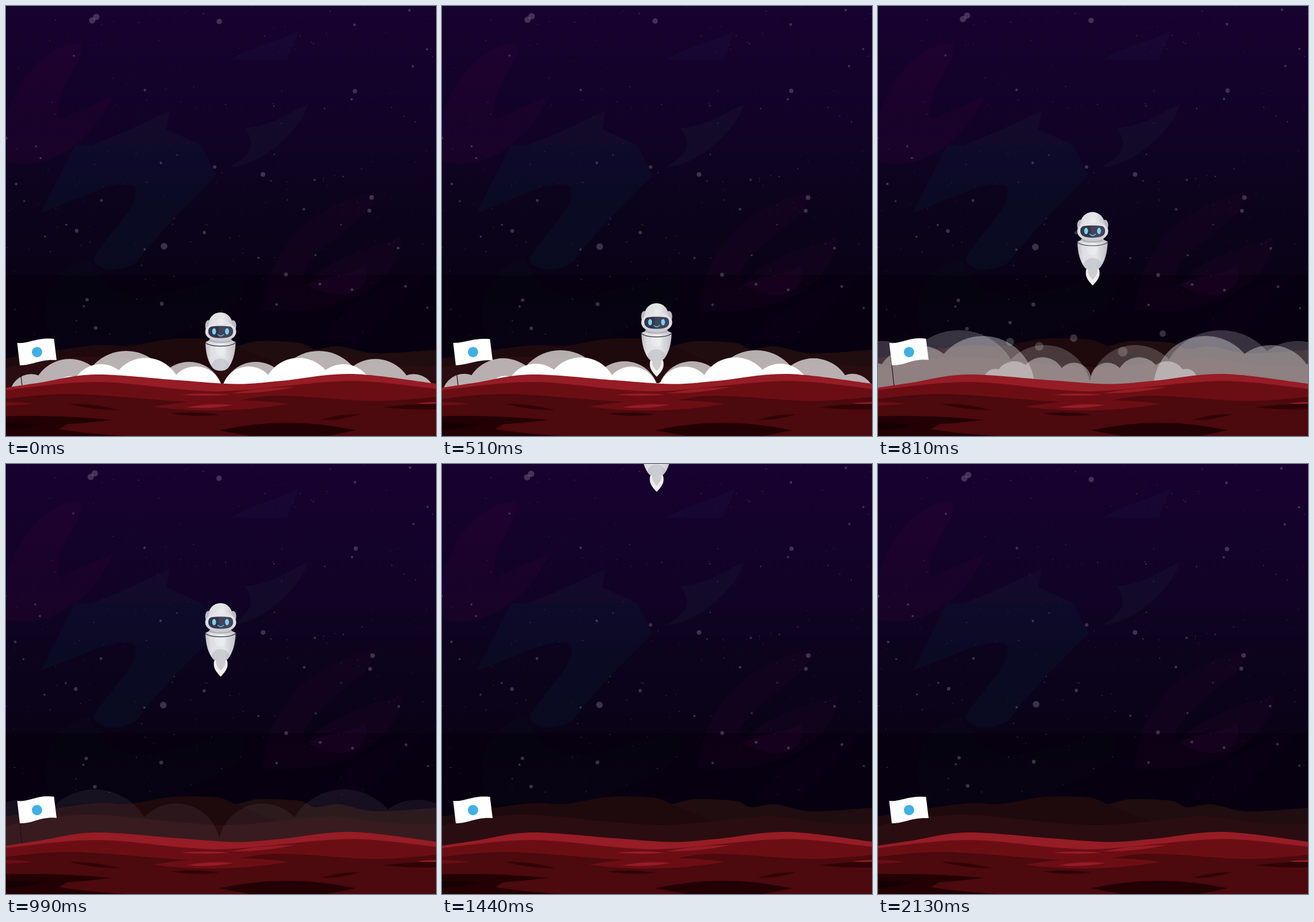
These frames come from a looping animation (748x748 px, 2.16 s). An HTML page with a canvas:

```html
<!DOCTYPE html>
<html lang="en">
<head>
<meta charset="utf-8">
<title>Lift-off</title>
<style>
html, body { margin: 0; width: 100%; height: 100%; overflow: hidden; background: #080113; }
canvas { display: block; width: 748px; height: 748px; }
</style>
</head>
<body>
<canvas id="stage" width="748" height="748"></canvas>
<script>
const SIZE = 748, LOOP = 2160, STEP = 30, TAU = 2 * Math.PI;
const ctx = document.getElementById('stage').getContext('2d');

const lerp = (a, b, k) => a + (b - a) * k;
const clamp = v => Math.max(0, Math.min(1, v));

function fill(shape, color) {
  ctx.fillStyle = color;
  ctx.fill(typeof shape === 'string' ? new Path2D(shape) : shape);
}

function stroke(d, color, width) {
  ctx.strokeStyle = color;
  ctx.lineWidth = width;
  ctx.stroke(new Path2D(d));
}

function oval(x, y, rx, ry, color) {
  ctx.beginPath();
  ctx.ellipse(x, y, rx, ry, 0, 0, TAU);
  ctx.fillStyle = color;
  ctx.fill();
}

function gradient(x0, y0, x1, y1, stops) {
  const g = ctx.createLinearGradient(x0, y0, x1, y1);
  stops.forEach(([at, color]) => g.addColorStop(at, color));
  return g;
}

// Smooth line through points, closed along the bottom of the stage
function ridge(points) {
  const p = new Path2D();
  const at = i => points[Math.max(0, Math.min(points.length - 1, i))];
  p.moveTo(...at(0));
  for (let i = 0; i < points.length - 1; i++) {
    const [a, b, c, d] = [at(i - 1), at(i), at(i + 1), at(i + 2)];
    p.bezierCurveTo(b[0] + (c[0] - a[0]) / 6, b[1] + (c[1] - a[1]) / 6,
      c[0] - (d[0] - b[0]) / 6, c[1] - (d[1] - b[1]) / 6, ...c);
  }
  p.lineTo(at(Infinity)[0], SIZE);
  p.lineTo(at(0)[0], SIZE);
  return p;
}

// ---- Sky ----
let seed = 41;
const rand = () => (seed = (seed * 16807) % 2147483647) / 2147483647;
const scatter = (n, size) => Array.from({ length: n }, () => [rand() * SIZE, rand() * 585, size()]);

const stars = [
  [150, 25, 5.5], [157, 19, 5.5], [371, 27, 4.7], [607, 148, 3.8], [447, 293, 4],
  [636, 333, 4], [632, 356, 3.4], [275, 418, 5.8], [123, 391, 3.2], [487, 467, 3.4],
  [271, 518, 3.4], [141, 511, 3], [156, 560, 3.2], [363, 280, 3], [345, 394, 2.9],
  ...scatter(28, () => 1.7 + rand() * .8),
  ...scatter(290, () => .4 + rand() * rand())
];

const nebulae = [
  ['M0 200C20 110 90 60 130 66C140 95 80 150 92 198L186 156C150 240 70 290 0 270Z', 'rgba(110,0,80,.09)'],
  ['M150 242L200 222L285 182L279 215L340 242Z', 'rgba(40,60,75,.13)'],
  ['M120 242H340L366 295C320 340 270 390 228 445C200 465 160 462 152 440C180 390 235 350 224 314C190 300 140 330 60 360Z', 'rgba(0,55,85,.13)'],
  ['M414 212C460 212 500 180 526 171C510 220 440 280 390 280C430 255 435 240 414 212Z', 'rgba(40,60,75,.12)'],
  ['M392 93C430 68 475 62 510 42L488 94Z', 'rgba(30,55,100,.1)'],
  ['M72 560C55 510 90 450 145 440C200 560 300 480 410 468C440 540 310 555 265 590H90Z', 'rgba(0,50,40,.06)'],
  ['M645 322C640 380 500 430 520 485C560 440 640 415 690 402C680 480 600 540 445 530C460 420 520 350 645 322Z', 'rgba(105,0,75,.07)'],
  ['M525 485C560 465 600 470 625 450C640 500 580 520 525 485Z', 'rgba(90,0,110,.1)'],
  ['M540 582C590 540 600 500 735 462C700 500 655 545 610 586Z', 'rgba(60,5,50,.08)']
];

function sky(t) {
  ctx.fillStyle = gradient(0, 0, 0, SIZE, [
    [0, '#180230'], [.2, '#130229'], [.325, '#100324'], [.46, '#0c031c'],
    [.6256, '#0a0317'], [.6257, '#060010'], [1, '#080012']
  ]);
  ctx.fillRect(0, 0, SIZE, SIZE);
  nebulae.forEach(([d, color]) => fill(d, color));
  // larger, nearer stars drift further from the centre
  const drift = (1 - Math.cos(t / LOOP * TAU)) / 2;
  stars.forEach(([x, y, r]) => {
    const k = drift * r * .0018;
    oval(x + (x - 415) * k, y + (y - 290) * k, r, r, 'rgba(205,190,220,.25)');
  });
}

// ---- Land ----
const hills = [
  ['#1f0d0f', [[330, 600], [398, 592], [440, 583], [510, 586], [538, 597], [580, 592], [642, 604], [748, 598]]],
  ['#1e090d', [[0, 613], [145, 591], [215, 591], [290, 579], [365, 580], [398, 591], [480, 625]]],
  ['#2a0d11', [[0, 629], [80, 615], [170, 611], [380, 628], [560, 613], [660, 624], [748, 627]]]
].map(([color, points]) => [ridge(points), color]);

const soil = [
  ['#961c25', [[0, 664], [60, 655], [155, 641], [300, 651], [400, 657.5], [480, 652], [600, 640], [748, 657]]],
  ['#6b0e14', [[0, 668], [155, 654], [320, 668], [400, 669], [560, 654], [640, 654], [748, 666]]],
  ['#4c090e', [[0, 683], [120, 675], [352, 690], [470, 678], [640, 687], [748, 680]]]
].map(([color, points]) => [ridge(points), color]);

const LIGHT = '#961c25', MID = '#6b0e14', DARK = '#300306', DEEP = '#230003';
// left end, right end, their heights, thickness, colour
const streaks = [
  [304, 390, 676, 676, 4, LIGHT], [390, 502, 674, 663, 6, LIGHT],
  [255, 493, 697, 692, 18, MID], [314, 396, 698, 694, 6, LIGHT],
  [-40, 48, 692, 692, 6, MID], [714, 790, 691, 691, 4, LIGHT],
  [110, 197, 692, 703, 6, DARK], [287, 371, 709, 711, 6, DARK],
  [549, 616, 720, 710, 6, DARK], [655, 830, 698, 696, 10, DARK],
  [-140, 185, 724, 720, 18, DEEP]
];

function lens([x0, x1, y0, y1, h, color]) {
  const x = (x0 + x1) / 2, y = (y0 + y1) / 2;
  fill(`M${x0} ${y0}Q${x} ${y - h} ${x1} ${y1}Q${x} ${y + h} ${x0} ${y0}Z`, color);
}

function ground() {
  soil.forEach(([p, color]) => fill(p, color));
  streaks.forEach(lens);
  fill('M0 720L110 726L92 736Q140 744 210 748H0Z', DEEP);
  lens([-60, 62, 734, 729, 12, '#170002']);
  fill('M370 738Q490 712 608 738L560 748H425Z', DEEP);
}

// ---- Smoke ----
// One half of a cloud at scale 1: distance from the axis, height, radius
const puffs = [[46, 31, 47], [133, 46, 62], [211, 35, 52], [264, 14, 30]];

// time, scale, lift, axis, opacity, size of the innermost puff
const clouds = [
  [[0, 1.26, 0, 376.5, .68, 1], [505, 1.265, 0, 376.5, .68, 1], [690, 1.77, 14, 367, .28, 1],
    [990, 1.63, 17, 371, .06, 1], [1080, 1.6, 17, 371, 0, 1]],
  [[0, 1, 0, 376, 1, 1], [505, 1, 0, 376, 1, 1], [690, 1.31, 14, 376, .7, 0], [930, 1.6, 20, 376, 0, 0]],
  [[505, .05, 0, 372, 1, 1], [690, .45, 12, 370, .94, 1], [890, .75, 22, 370, 0, 1]]
];

function smoke(keys, t) {
  const i = keys.findIndex(k => k[0] > t);
  if (i < 1) return;
  const a = keys[i - 1], b = keys[i];
  const k = (t - a[0]) / (b[0] - a[0]);
  const [, scale, lift, axis, alpha, core] = a.map((v, n) => lerp(v, b[n], k));
  const p = new Path2D();
  puffs.forEach(([dx, h, size], n) => {
    const s = n ? scale : scale * core;
    const r = size * s, y = 658 - h * s - lift + r;
    for (const x of [axis - dx * scale, axis + dx * scale]) {
      p.moveTo(x + r, y);
      p.arc(x, y, r, 0, TAU);
    }
  });
  fill(p, `rgba(255,255,255,${alpha})`);
}

const drops = [[282, 588, 3], [282, 609, 7], [314, 614, 7.5], [352, 605, 6.5], [406, 620, 8.5], [450, 600, 5.5]];

function spray(t) {
  if (t < 560 || t > 840) return;
  const k = Math.pow((t - 560) / 130, .7);
  ctx.globalAlpha = .95 * clamp((840 - t) / 150);
  drops.forEach(([x, y, r]) => oval(lerp(372, x, k), lerp(652, y, k), r, r, '#fff'));
  ctx.globalAlpha = 1;
}

function flag(t) {
  const w = Math.sin(t / LOOP * 3 * TAU) * 1.3;
  stroke('M19.5 585L28 661', '#1d1018', 1.2);
  fill(`M19.5 586C40 ${588 + w} 52 ${576 - w} 83.5 ${579 - w / 3}L88 ${616 - w / 3}C58 ${614 - w} 48 ${625 + w} 24 625Z`, '#fff');
  oval(54, 602, 9, 9, '#3fb0e3');
}

// ---- Robot ----
// time, height, speed
const climb = [
  [0, 0, 0], [390, 0, 0], [510, 16, .34], [690, 103, .58],
  [990, 291, .68], [1260, 483, .72], [1560, 699, .72]
];

function height(t) {
  const i = climb.findIndex(k => k[0] > t);
  if (i < 0) return SIZE;
  const [t0, h0, v0] = climb[i - 1], [t1, h1, v1] = climb[i];
  const d = t1 - t0, k = (t - t0) / d, k2 = k * k, k3 = k2 * k;
  return lerp(h0, h1, 3 * k2 - 2 * k3) + v0 * d * (k3 - 2 * k2 + k) + v1 * d * (k3 - k2);
}

const body = new Path2D('M347 585C347 604 352 621 360 630C366 636 380 636 386 630C394 621 399 604 399.5 585C390 577 357 577 347 585Z');
const visor = new Path2D('M358 557.5Q373.5 555.5 389 557.5C394 558.5 395.5 563 395 567.5C394.5 574 389 577.8 373.5 577.8C358 577.8 352.5 574 352 567.5C351.5 563 353 558.5 358 557.5Z');

function flame(size) {
  ctx.save();
  ctx.translate(373.5, 630);
  ctx.scale(size, size);
  const drop = 'M0 31C-7 23 -12 18 -12 9C-12 -1 -6 -4 0 -4C6 -4 12 -1 12 9C12 18 7 23 0 31Z';
  fill(drop, '#f1f0f0');
  ctx.scale(.67, .67);
  fill(drop, '#cfcdcd');
  ctx.restore();
}

function robot(t) {
  ctx.save();
  ctx.translate(0, -height(t));
  flame(clamp((t - 380) / 110));

  const shell = gradient(346, 0, 400, 0, [[0, '#bdbdc3'], [.2, '#dfdfe3'], [.6, '#e6e7ea'], [1, '#bfbfc5']]);
  fill(body, shell);
  ctx.save();
  ctx.clip(body);
  oval(373, 628, 16, 15, 'rgba(165,172,178,.42)');
  oval(373, 597, 9.5, 11, 'rgba(255,255,255,.22)');
  ctx.restore();
  stroke('M347.3 586C356 593.5 390 593.5 399.2 586', '#2b2b38', 1.1);
  oval(373, 581.5, 20, 5, '#b4b3ba');

  for (const x of [352, 395]) oval(x, 556, 5.5, 9.5, '#bcbbc2');
  oval(373, 554, 21, 21, shell);
  oval(373.5, 566.5, 27, 17.5, gradient(0, 548, 0, 584, [[0, '#e6e6e9'], [.7, '#dadade'], [1, '#c4c4ca']]));
  oval(373, 549, 6, 7, 'rgba(255,255,255,.2)');

  fill(visor, gradient(352, 0, 395, 0, [[.4, '#34354a'], [.45, '#434459']]));
  for (const x of [362, 384.5]) oval(x, 566, 3.4, 5.6, '#79d2f4');
  ctx.lineCap = 'round';
  stroke('M368.5 571.5Q373.5 576.5 378.5 571.5', '#5fc1ea', 1.5);
  ctx.restore();
}

const start = performance.now();

function frame() {
  const now = (performance.now() - start) % LOOP;
  const t = Math.floor(now / STEP) * STEP;
  sky(t);
  hills.forEach(([p, color]) => fill(p, color));
  clouds.forEach(keys => smoke(keys, t));
  spray(t);
  flag(t);
  ground();
  robot(t);
  requestAnimationFrame(frame);
}
frame();
</script>
</body>
</html>
```
